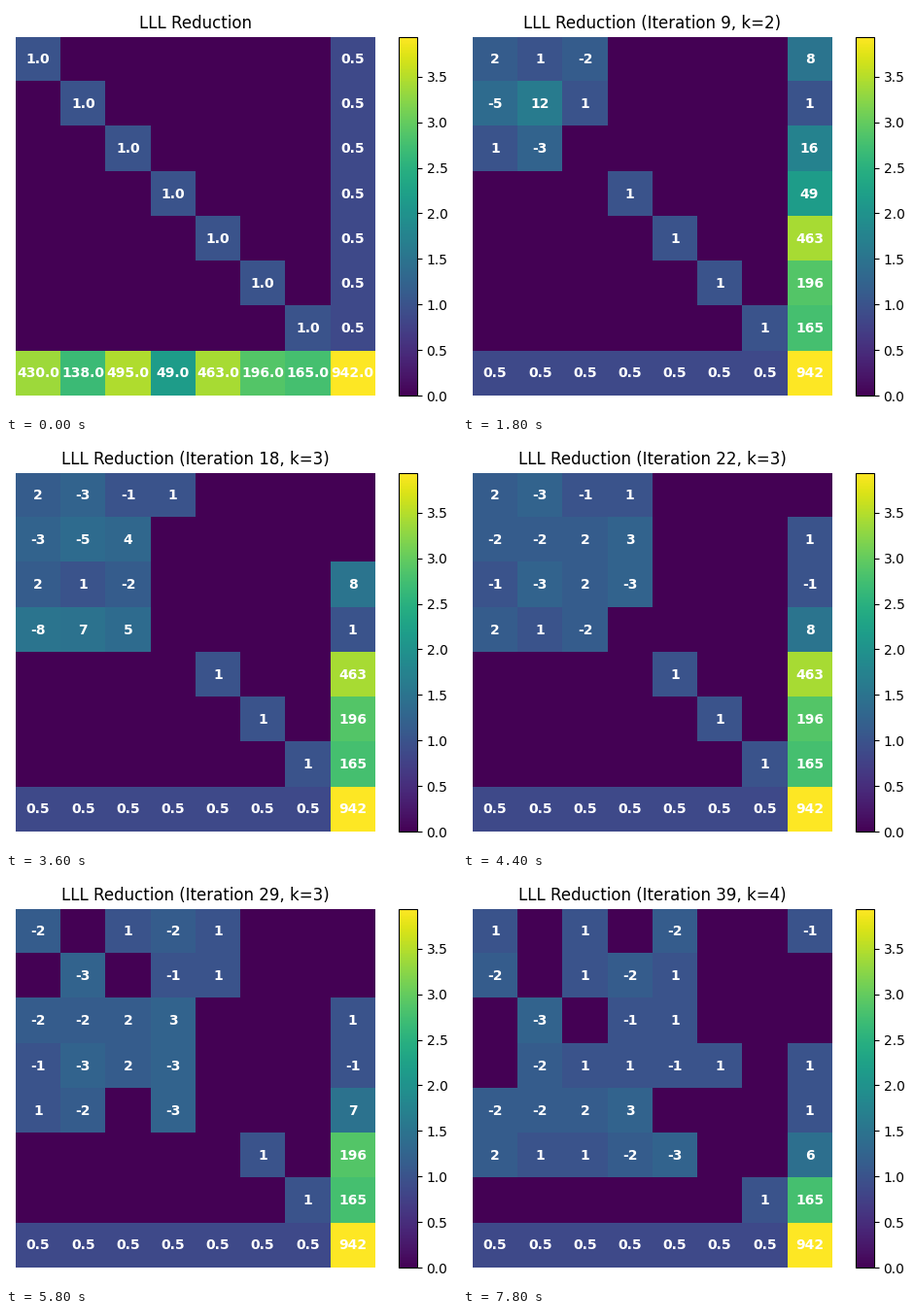
A matplotlib script for the animation above (8000 ms loop, 464 by 420 pixels).

```python
import numpy as np
import matplotlib.pyplot as plt
from matplotlib.animation import FuncAnimation

W, H, DPI = 464, 420, 100
FRAMES, INTERVAL = 40, 200
WEIGHTS = [430, 138, 495, 49, 463, 196, 165]
TOTAL = 942
DELTA = 0.75


def subset_sum_basis():
    n = len(WEIGHTS)
    basis = np.eye(n + 1)
    basis[:n, n] = WEIGHTS
    basis[n] = 0.5
    basis[n, n] = TOTAL
    return basis


def gram_schmidt(basis):
    ortho = basis.copy()
    for i in range(1, len(basis)):
        for j in range(i):
            ortho[i] -= basis[i] @ ortho[j] / (ortho[j] @ ortho[j]) * ortho[j]
    return ortho


def lll_steps(basis):
    """Yield (basis, k) after every pass of the LLL main loop."""
    b, k = basis.copy(), 1
    while k < len(b):
        ortho = gram_schmidt(b)
        norms = (ortho ** 2).sum(axis=1)
        for j in range(k - 1, -1, -1):
            mu = b[k] @ ortho[j] / norms[j]
            if abs(mu) > 0.5:
                b[k] -= round(mu) * b[j]
        mu = b[k] @ ortho[k - 1] / norms[k - 1]
        if norms[k] >= (DELTA - mu ** 2) * norms[k - 1]:
            k += 1
        else:
            b[[k - 1, k]] = b[[k, k - 1]]
            k = max(k - 1, 1)
        yield b.copy(), k


def shade(matrix):
    return np.abs(matrix) ** 0.2


def add_axes(x, y, w, h):
    return fig.add_axes([x / W, y / H, w / W, h / H])


start = subset_sum_basis()
steps = [step for step, _ in zip(lll_steps(start), range(FRAMES - 1))]

# the small margin keeps the pixel size from being truncated
fig = plt.figure(figsize=((W + 0.01) / DPI, (H + 0.01) / DPI), dpi=DPI)
ax = add_axes(10, 18.6, 369.6, 369.6)
cax = add_axes(404.4, 18.6, 18.48, 369.6)

image = ax.imshow(shade(start.T), cmap="viridis", vmin=0,
                  vmax=shade(TOTAL), aspect="auto")
ax.axis("off")
title = ax.set_title("LLL Reduction")
fig.colorbar(image, cax=cax)

size = len(start)
labels = [[ax.text(col, row, "", ha="center", va="center",
                   color="white", weight="bold")
           for col in range(size)] for row in range(size)]


def draw(frame):
    if frame == 0:
        matrix, heading, style = start.T, "LLL Reduction", "{:.1f}"
    else:
        matrix, k = steps[frame - 1]
        heading, style = f"LLL Reduction (Iteration {frame}, k={k})", "{:g}"
    title.set_text(heading)
    image.set_data(shade(matrix))
    for row, values in zip(labels, matrix):
        for label, value in zip(row, values):
            label.set_text(style.format(value) if value else "")


anim = FuncAnimation(fig, draw, frames=FRAMES, interval=INTERVAL,
                     repeat=True, repeat_delay=0, init_func=lambda: draw(0))
plt.show()
```
